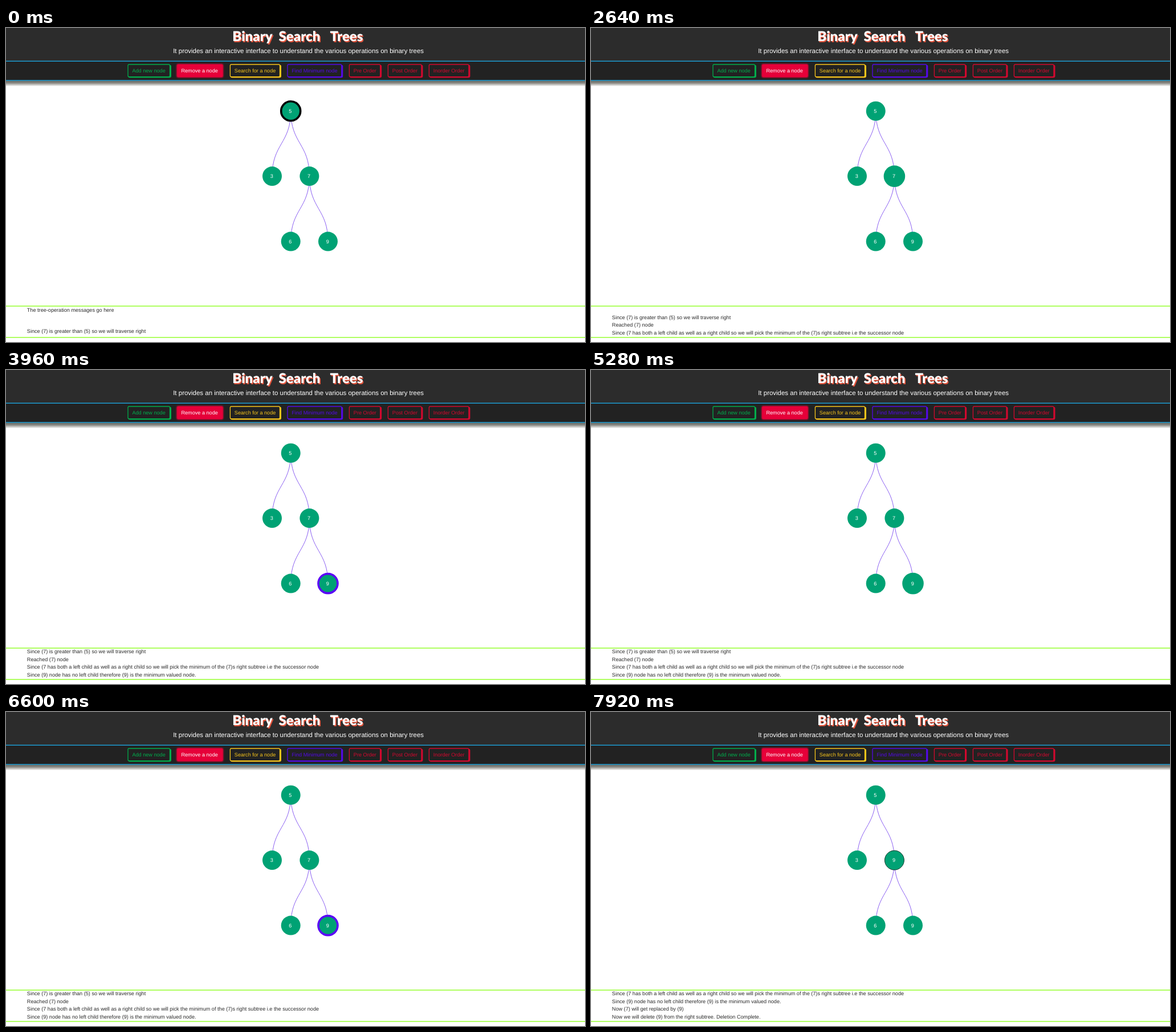
An HTML page for the animation above (8000 ms loop, 1016 px wide and 551 px high).

```html
<!DOCTYPE html>
<html lang="en">
<head>
<meta charset="utf-8">
<title>Binary Search Trees</title>
<style>
  html, body { margin: 0; width: 100%; height: 100%; overflow: hidden; background: #fff; }
  svg { display: block; width: 100%; height: 100%; }
  text { font: 9.14px "Liberation Sans", Arial, sans-serif; text-rendering: geometricPrecision; }
  .title text { font: 900 24px Lato, sans-serif; text-anchor: middle; }
  .subtitle { font-size: 11.47px; fill: #fff; }
  .edges { fill: none; stroke: #7d4df0; stroke-width: .9; }
  .nodes circle { fill: #00a274; stroke-width: 0; }
  .nodes text { fill: #fff; text-anchor: middle; }
  .log { fill: #2b2b2b; }
</style>
</head>
<body>
<svg viewBox="0 0 1016 551">
  <defs>
    <linearGradient id="shade" x2="0" y2="1">
      <stop offset="0" stop-color="#65655f"/>
      <stop offset=".4" stop-color="#85857f"/>
      <stop offset="1" stop-color="#fff"/>
    </linearGradient>
    <clipPath id="logArea"><path d="M0 488h1016v54H0z"/></clipPath>
    <filter id="glow" x="-10%" y="-20%" width="120%" height="140%"><feGaussianBlur stdDeviation="1"/></filter>
  </defs>
  <rect y="92" width="1016" height="10.5" fill="url(#shade)"/>
  <rect width="1016" height="58" fill="#2c2c2c"/>
  <rect y="58" width="1016" height="34" fill="#222"/>
  <path d="M0 58.2h1016M0 92h1016" stroke="#1c9bd1" stroke-width="1.6"/>
  <g class="title" id="title"></g>
  <text class="subtitle" x="293.2" y="44">It provides an interactive interface to understand the various operations on binary trees</text>
  <g id="buttons"></g>
  <g class="edges" id="edges"></g>
  <g class="nodes" id="nodes"></g>
  <g clip-path="url(#logArea)"><g class="log" id="log"></g></g>
  <path d="M0 488h1016M0 543h1016" stroke="#97ff2f" stroke-width="1.6"/>
</svg>
<script>
const $ = id => document.getElementById(id);
const LOOP = 8000;
const GREEN = '#00a274', PURPLE = '#5a05f5', RED = '#d4082f';

const words = [['Binary', 432.5], ['Search', 515], ['Trees', 597.5]];
const titleLayer = (shift, color) => words.map(([word, x]) =>
  `<text x="${x + shift}" y="${23 + shift}" fill="${color}">${word}</text>`).join('');
$('title').innerHTML = titleLayer(1.6, '#e2533b') + titleLayer(0, '#fff');

const buttons = [
  ['Add new node', 213.3, 76.7, '#00ad4c'],
  ['Remove a node', 299.3, 82, '#e60039', true],
  ['Search for a node', 392.7, 90.3, '#f8c51b'],
  ['Find Minimum node', 493.3, 98, '#540ae8'],
  ['Pre Order', 601.7, 57.5, RED],
  ['Post Order', 669.7, 61.8, RED],
  ['Inorder Order', 741.7, 72.8, RED],
];
$('buttons').innerHTML = buttons.map(([label, x, w, color, filled]) => {
  const box = filled
    ? `<rect x="${x}" y="63" width="${w}" height="24" rx="3" fill="${color}" filter="url(#glow)"/>
       <rect x="${x + 1}" y="64" width="${w - 2}" height="22" rx="2" fill="${color}"/>`
    : `<rect x="${x + 1}" y="64.6" width="${w - 1}" height="22.6" rx="3" fill="${color}"/>
       <rect x="${x + .7}" y="64" width="${w - 3.2}" height="21.6" rx="2" fill="#222" stroke="${color}" stroke-width="1.3"/>`;
  return `${box}<text x="${x + 8.1}" y="77.7" fill="${filled ? '#fff' : color}">${label}</text>`;
}).join('');

const nodes = [[5, 499.7, 145.8], [3, 467, 260.1], [7, 532.4, 260.1], [6, 499.7, 374.6], [9, 565, 374.6]];
const links = [[0, 1], [0, 2], [2, 3], [2, 4]];
$('edges').innerHTML = links.map(([from, to]) => {
  const [, x1, y1] = nodes[from], [, x2, y2] = nodes[to], mid = (y1 + y2) / 2;
  return `<path d="M${x1} ${y1}C${x1} ${mid} ${x2} ${mid} ${x2} ${y2}"/>`;
}).join('');
$('nodes').innerHTML = nodes.map(([value, x, y]) =>
  `<circle cx="${x}" cy="${y}" r="17"/><text x="${x - .8}" y="${y + 3.3}">${value}</text>`).join('');
const circles = $('nodes').querySelectorAll('circle');
const labels = $('nodes').querySelectorAll('text');

const messages = [
  'The tree-operation messages go here',
  'Since (7) is greater than (5) so we will traverse right',
  'Reached (7) node',
  'Since (7 has both a left child as well as a right child so we will pick the minimum of the (7)s right subtree i.e the successor node',
  'Since (9) node has no left child therefore (9) is the minimum valued node.',
  'Now (7) will get replaced by (9)',
  'Now we will delete (9) from the right subtree. Deletion Complete.',
];
const lineY = i => i ? 36.4 + (i - 1) * 13.65 : 0;
$('log').innerHTML = messages.map((text, i) => `<text x="36.8" y="${lineY(i)}">${text}</text>`).join('');
const lines = $('log').querySelectorAll('text');

// start time, last message, ringed node, ring colour, ring width
const steps = [
  [0, 1, 0, '#000', 3.6],
  [660, 2, 2, '#000', 3.6],
  [1320, 2, 2, GREEN, 3.6],
  [2640, 3, 2, GREEN, 3.6],
  [3960, 4, 4, PURPLE, 3.6],
  [5280, 4, 4, GREEN, 3.6],
  [6600, 4, 4, PURPLE, 3.6],
  [7260, 5, 2, GREEN, 0],
  [7920, 6, 2, '#10382c', 1],
];

function draw(now) {
  const time = now % LOOP;
  const [, last, ringed, color, width] = steps.findLast(step => step[0] <= time);
  circles.forEach((circle, i) => {
    circle.style.stroke = color;
    circle.style.strokeWidth = i === ringed ? width : 0;
  });
  labels[2].textContent = last === 6 ? 9 : 7;
  lines.forEach((line, i) => line.style.display = i <= last ? '' : 'none');
  const bottom = last === 1 ? 534.8 : 538.1;
  $('log').setAttribute('transform', `translate(0 ${bottom - lineY(last)})`);
}

const start = performance.now();
function tick() {
  draw(performance.now() - start);
  requestAnimationFrame(tick);
}
tick();
</script>
</body>
</html>
```
